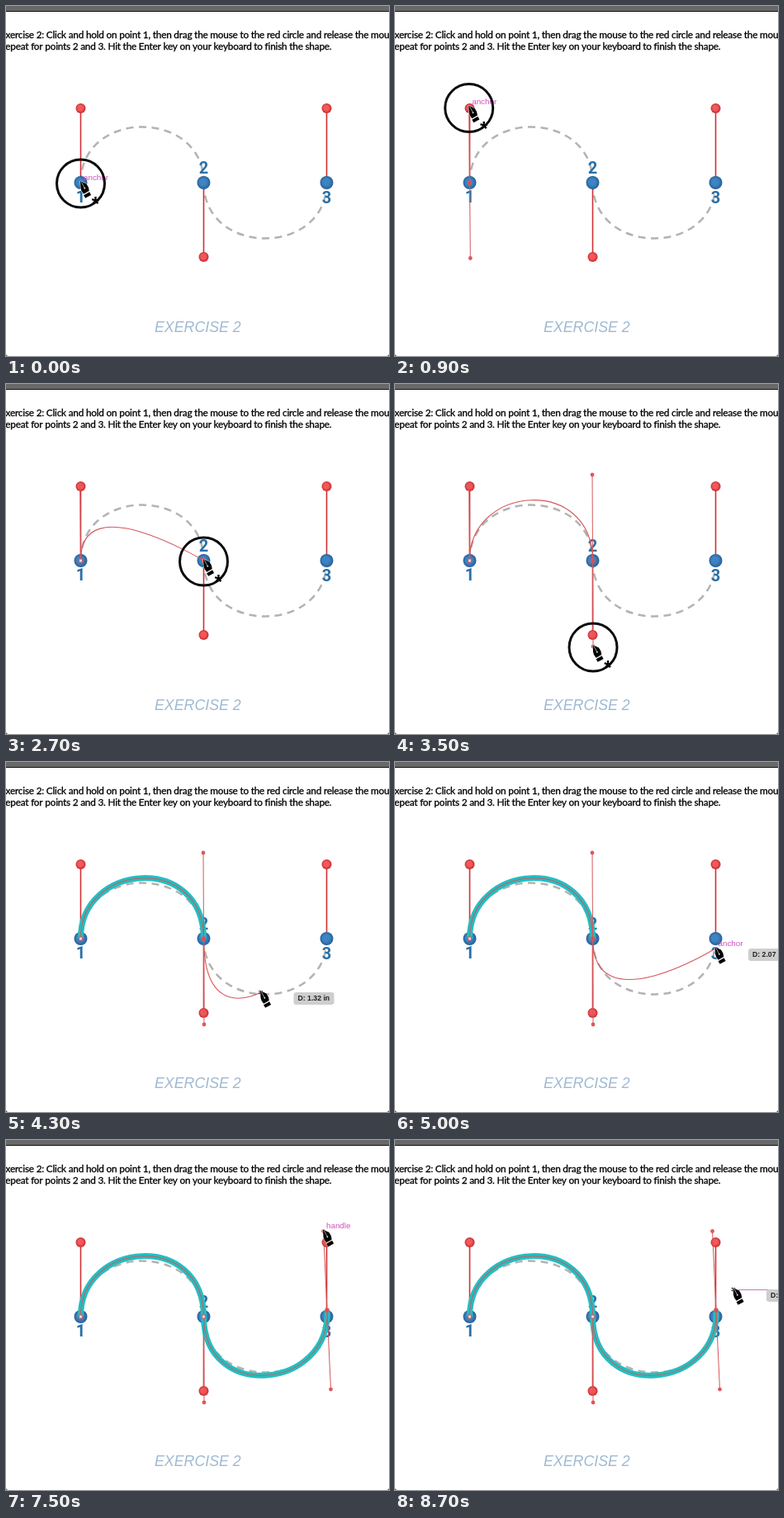
An HTML page with a canvas that plays this animation: 464x424 px, repeating every 8.8 s.

```html
<!DOCTYPE html>
<html lang="en">
<head>
<meta charset="utf-8">
<title>Pen tool exercise</title>
<style>
html, body { margin: 0; width: 464px; height: 424px; overflow: hidden; background: #fff; }
canvas { display: block; }
</style>
</head>
<body>
<canvas id="stage" width="464" height="424"></canvas>
<script>
const g = document.getElementById('stage').getContext('2d');
const LOOP = 8800, STEP = 100;
const RED = '#d5575b', MAGENTA = '#c07abf', TEAL = '#22bfc3';
const SANS = '"Liberation Sans", Arial, sans-serif';

// Points of the path being drawn
const A1 = [90.5, 214], A2 = [239.5, 214], A3 = [389, 206.3];
const H1 = [89.7, 122.5], H2 = [240, 318], H3 = [384.5, 110.5];

// Cursor track: time, x, y
const track = [
  [0, 90.5, 214], [100, 90.5, 214], [800, ...H1], [1000, ...H1],
  [1800, 217, 183], [2400, 239.5, 214], [2700, 239.5, 214], [3500, ...H2],
  [3900, ...H2], [4700, 377, 240], [5000, 388, 226], [5300, ...A3],
  [5400, ...A3], [5900, 393, 129], [6500, 386, 112], [6900, 386, 112],
  [7100, ...H3], [8000, ...H3], [8700, 410, 181]
];

// Hover tags: from, to, word
const tags = [
  [0, 200, 'anchor'], [700, 1000, 'anchor'], [2400, 2700, 'anchor'],
  [4900, 5300, 'anchor'], [5800, 6000, 'anchor'], [7400, 8000, 'handle']
];

const within = (t, ...spans) => spans.some(([a, b]) => t >= a && t < b);
const mirror = (p, c) => [2 * c[0] - p[0], 2 * c[1] - p[1]];

function cursorAt(t) {
  const i = track.findIndex(k => k[0] > t);
  if (i < 0) return track[track.length - 1].slice(1);
  const [t0, x0, y0] = track[i - 1], [t1, x1, y1] = track[i];
  const u = (t - t0) / (t1 - t0), e = u * u * (3 - 2 * u);
  return [x0 + (x1 - x0) * e, y0 + (y1 - y0) * e];
}

function stroke(color, width) {
  g.strokeStyle = color;
  g.lineWidth = width;
  g.stroke();
}

function line(a, b, color, width) {
  g.beginPath();
  g.moveTo(...a);
  g.lineTo(...b);
  stroke(color, width);
}

function curve(a, b, c, d, color, width) {
  g.beginPath();
  g.moveTo(...a);
  g.bezierCurveTo(...b, ...c, ...d);
  stroke(color, width);
}

function disc([x, y], r, color) {
  g.beginPath();
  g.arc(x, y, r, 0, 7);
  g.fillStyle = color;
  g.fill();
}

function ball([x, y], r, light, dark) {
  const shade = g.createRadialGradient(x - r / 5, y - r / 5, 0, x, y, r);
  shade.addColorStop(0, light);
  shade.addColorStop(0.5, light);
  shade.addColorStop(1, dark);
  disc([x, y], r, shade);
}

function text(str, x, y, font, color, align = 'left') {
  g.font = font;
  g.fillStyle = color;
  g.textAlign = align;
  g.fillText(str, x, y);
}

function anchor([x, y], active) {
  g.fillStyle = active ? '#e8484c' : '#f3d5d6';
  g.fillRect(x - 2, y - 2, 4, 4);
  g.strokeStyle = RED;
  g.lineWidth = 1;
  g.strokeRect(x - 2, y - 2, 4, 4);
}

function handle(from, to) {
  line(from, to, RED, 1);
  disc(to, 2.4, '#e2575b');
}

// Body copy, slightly emboldened and tightly set
function copy(str, x, y) {
  g.letterSpacing = '-0.21px';
  text(str, x, y, '11.8px Lato, "Open Sans", sans-serif', '#000');
  g.strokeStyle = '#000';
  g.lineWidth = 0.3;
  g.strokeText(str, x, y);
  g.letterSpacing = '0px';
}

function worksheet() {
  g.fillStyle = '#fff';
  g.fillRect(0, 0, 464, 424);
  g.fillStyle = '#686868';
  g.fillRect(0, 0, 464, 6);
  g.fillStyle = '#111';
  g.fillRect(0, 6, 464, 1);
  for (const [x, dx] of [[0, 3], [464, -3]]) {
    g.beginPath();
    g.moveTo(x, 421);
    g.quadraticCurveTo(x, 424, x + dx, 424);
    g.lineTo(x, 424);
    g.fillStyle = '#333';
    g.fill();
  }

  copy('Exercise 2: Click and hold on point 1, then drag the mouse to the red circle and release the mouse.', -7, 39);
  copy('Repeat for points 2 and 3. Hit the Enter key on your keyboard to finish the shape.', -7.5, 53);
  text('EXERCISE 2', 180, 395, `italic 17.8px ${SANS}`, '#9fb9d2');

  g.setLineDash([9, 6.5]);
  curve([90.5, 214], [90.5, 124], [239.5, 124], [239.5, 214], '#b3b3b3', 2.5);
  curve([239.5, 214], [239.5, 304], [388.5, 304], [388.5, 214], '#b3b3b3', 2.5);
  g.setLineDash([]);

  [[90.5, 124, 238], [239.5, 304, 203], [388.5, 124, 239]].forEach(([x, y, base], i) => {
    text(i + 1, x, base, 'bold 20px Roboto, Arial, sans-serif', '#2a70a6', 'center');
    line([x, 214], [x, y], '#cf3035', 1.6);
    ball([x, 214], 8, '#3d84c2', '#265f98');
    ball([x, y], 6, '#f4595a', '#c42a2e');
  });
}

function drawing(t, p) {
  const rub = (a, h) => curve(a, h, p, p, RED, 1.1);
  const seg1 = [A1, H1, mirror(H2, A2), A2];

  if (t < 1000) {
    if (t >= STEP) {
      handle(A1, p);
      handle(A1, mirror(p, A1));
      anchor(A1, true);
    }
    return;
  }
  if (t < 2600) {
    handle(A1, H1);
    handle(A1, mirror(H1, A1));
    rub(A1, H1);
    anchor(A1, true);
    return;
  }
  if (t < 3900) {
    handle(A1, H1);
    curve(A1, H1, mirror(p, A2), A2, RED, 1.1);
    handle(A2, p);
    handle(A2, mirror(p, A2));
    anchor(A1, false);
    anchor(A2, true);
    return;
  }

  const h3 = t < 8000 ? p : H3;
  const seg2 = [A2, H2, mirror(h3, A3), A3];
  const released = t >= 7400;
  curve(...seg1, TEAL, 7);
  if (released) curve(...seg2, TEAL, 7);
  if (t < 5300 || released) curve(...seg1, '#b5696b', 1.3);

  handle(A2, H2);
  if (t < 5300) {
    handle(A2, mirror(H2, A2));
    rub(A2, H2);
  } else {
    curve(...seg2, released ? '#b5696b' : RED, 1.1);
    handle(A3, h3);
    handle(A3, mirror(h3, A3));
    anchor(A3, true);
  }
  if (t < 5300 || released) anchor(A1, false);
  anchor(A2, t < 5300);
}

function pen([x, y], pressed) {
  g.save();
  g.translate(x, y - 1);
  g.lineJoin = 'round';
  for (const d of ['M-.5 0L7 3.6Q10 7.5 10.2 12L3.6 15.8Q.4 12.5 0 8.5Z', 'M3.6 17.2L10.6 13.2L12.6 17L5.6 20.8Z']) {
    const shape = new Path2D(d);
    g.strokeStyle = '#fff';
    g.lineWidth = 1;
    g.stroke(shape);
    g.fillStyle = '#000';
    g.fill(shape);
  }
  line([0.8, 1.2], [4.4, 8], '#ddd', 0.7);
  disc([4.8, 8.8], 1, '#ddd');
  g.restore();
  if (pressed) text('*', x + 18, y + 35, `bold 24px ${SANS}`, '#000', 'center');
}

function label([x, y], from) {
  const inches = Math.hypot(x - from[0], y - from[1]) / 72;
  g.beginPath();
  g.roundRect(x + 40, y, 49, 15, 3);
  g.fillStyle = '#cecece';
  g.fill();
  text(`D: ${inches.toFixed(2)} in`, x + 45, y + 10.3, `bold 8.7px ${SANS}`, '#222');
}

function render(t) {
  const p = cursorAt(t);
  const pressed = within(t, [0, 1000], [2600, 3900], [5300, 7400]);
  const moving = within(t, [1100, 2600], [4000, 5300], [8100, LOOP]);
  const tag = tags.find(([a, b]) => t >= a && t < b);

  worksheet();
  drawing(t, p);

  if (within(t, [1700, 2000], [8700, LOOP])) line([p[0], p[1] + 0.5], [464, p[1] + 0.5], MAGENTA, 1);
  if (tag) text(tag[2], p[0] + 3.5, p[1] - 3.5, `9.8px ${SANS}`, '#d04fc0');
  if (moving) {
    label(p, t < 2600 ? A1 : t < 5300 ? A2 : A3);
    if (!tag) {
      const [x, y] = p;
      line([x - 2, y - 2], [x + 2, y + 2], '#111', 1.2);
      line([x - 2, y + 2], [x + 2, y - 2], '#111', 1.2);
    }
  }

  // The pen trails behind the snapped point near the second anchor
  const lag = Math.max(0, 1 - Math.abs(t - 1800) / 400);
  pen([p[0] + 7 * lag, p[1] - 1 + 6 * lag], pressed);
  if (pressed) {
    g.beginPath();
    g.arc(p[0], p[1] + 1, 29, 0, 7);
    stroke('#0a0a0a', 3);
  }
}

function loop() {
  const t = performance.now() % LOOP;
  render(Math.floor(t / STEP) * STEP);
  requestAnimationFrame(loop);
}
loop();
</script>
</body>
</html>
```
